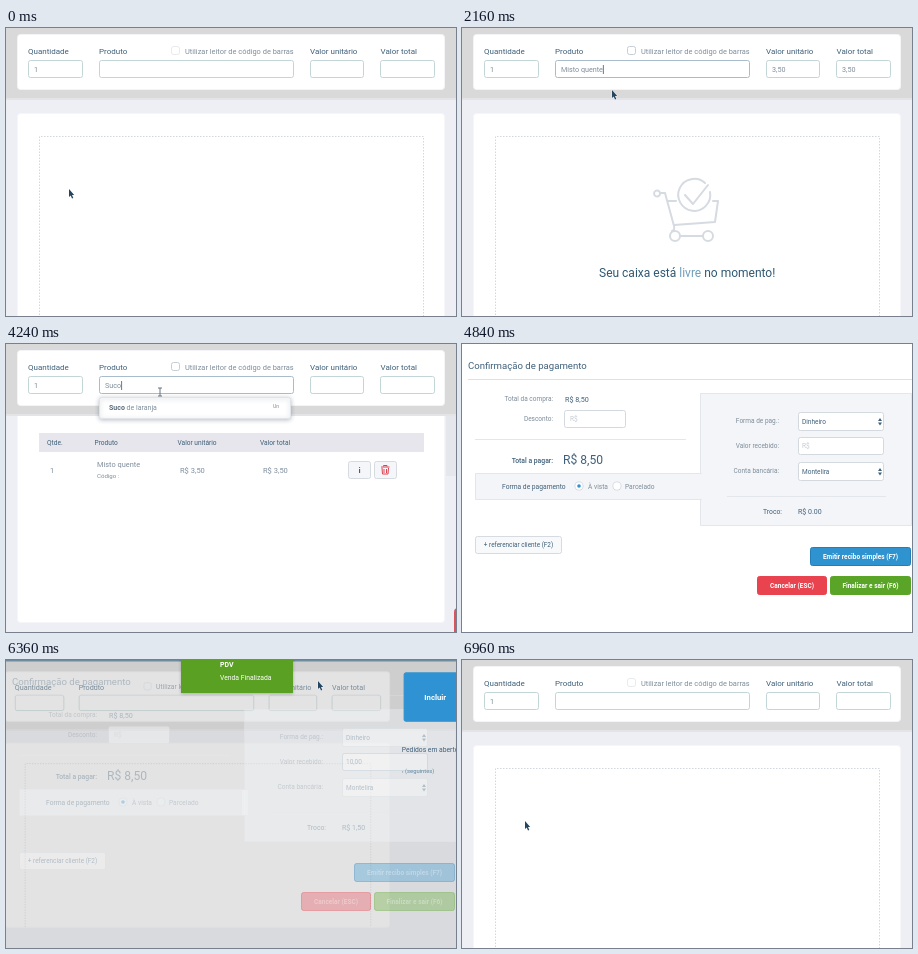
These frames come from a looping animation (450 px wide and 288 px high, 7 s). An HTML page with a canvas:

```html
<!DOCTYPE html>
<html lang="pt-BR">
<head>
<meta charset="utf-8">
<title>Frente de caixa</title>
<style>
html, body { margin: 0; width: 100%; height: 100%; overflow: hidden; background: #eeeff4; }
canvas { display: block; }
</style>
</head>
<body>
<canvas id="stage" width="450" height="288"></canvas>
<script>
const ctx = document.getElementById('stage').getContext('2d');
const LOOP = 7000, STEP = 40;
const SALE_END = 6100, REVEAL = 6280;
const INK = '#3f607a', SOFT = '#7e8d9b', PALE = '#c3cad2';

const ramp = (t, a, b) => Math.min(1, Math.max(0, (t - a) / (b - a)));
const ease = u => u * u * (3 - 2 * u);
const within = (t, a, b) => t >= a && t < b;
const typed = (s, t, start, gap) => t < start ? '' : s.slice(0, Math.floor((t - start) / gap) + 1);

// y is the visual middle of the line
function text(s, x, y, size, color = INK, weight = 400, align = 'left') {
  ctx.font = `${weight} ${size}px Roboto, sans-serif`;
  ctx.textAlign = align;
  ctx.fillStyle = color;
  ctx.fillText(s, x, y + size * .35);
  return ctx.measureText(s).width;
}

function box(x, y, w, h, fill, border, r = 2) {
  ctx.beginPath();
  ctx.roundRect(x + .5, y + .5, w - 1, h - 1, r);
  ctx.fillStyle = fill;
  ctx.fill();
  ctx.lineWidth = 1;
  ctx.strokeStyle = border || fill;
  ctx.stroke();
}

function path(d, color, width = 1) {
  ctx.strokeStyle = color;
  ctx.lineWidth = width;
  ctx.stroke(new Path2D(d));
}

function disc(x, y, r, fill) {
  ctx.beginPath();
  ctx.arc(x, y, r, 0, 7);
  ctx.fillStyle = fill;
  ctx.fill();
}

function fade(alpha, draw) {
  if (alpha <= 0) return;
  ctx.save();
  ctx.globalAlpha *= alpha;
  draw();
  ctx.restore();
}

function shadow(color, blur, dy, draw) {
  ctx.save();
  ctx.shadowColor = color;
  ctx.shadowBlur = blur;
  ctx.shadowOffsetY = dy;
  draw();
  ctx.restore();
}

// the register page is seen slightly smaller right after a sale
function camera(t, draw) {
  const zoom = t < REVEAL ? 1 : .9 + .1 * ease(ramp(t, 6440, 6880));
  const out = (1 - zoom) * 10;
  ctx.save();
  ctx.translate(-11 * out, 6 * out);
  ctx.scale(zoom, zoom);
  draw();
  ctx.restore();
}

function cart() {
  ctx.save();
  ctx.lineCap = ctx.lineJoin = 'round';
  path('M203 165H198a3 3 0 1 0 0 1M203 165L212 198Q213 202 210 203' +
    'M206 173H214M251 173H256L253 194L212 197' +
    'M218 208H241M218 208a5 5 0 1 0-10 0a5 5 0 1 0 10 0' +
    'M251 208a5 5 0 1 0-10 0a5 5 0 1 0 10 0' +
    'M243 155A16 16 0 1 0 248 164M223 167L231 176L246 157', '#d6dbe2', 2);
  ctx.restore();
}

function emptyState(t) {
  ctx.setLineDash([1.5, 1.5]);
  path('M33.5 290V108.5H417.5V290', '#d3d7dd');
  ctx.setLineDash([]);
  fade(t < SALE_END ? ramp(t, 40, 440) : 0, () => {
    cart();
    let x = 137;
    x += text('Seu caixa está ', x, 244.5, 12, '#2f5873');
    x += text('livre', x, 244.5, 12, '#6f9dba');
    text(' no momento!', x, 244.5, 12, '#2f5873');
  });
}

function row(y, name, price) {
  text('1', 44, y, 7.4, SOFT);
  text(name, 91, y - 6, 7.4, SOFT);
  text('Código :', 91, y + 6, 6.1, SOFT);
  text(price, 174, y, 7.5, SOFT);
  text(price, 257, y, 7.5, SOFT);
  box(342, y - 9, 23, 18, '#f5f6f9', '#d6dae1');
  box(368, y - 9, 23, 18, '#f5f6f9', '#d6dae1');
  text('i', 353.5, y, 8, INK, 700, 'center');
  path(`M375 ${y - 3}H383.500M377.500 ${y - 3.5}V${y - 4.5}H381V${y - 3.5}` +
    `M376 ${y - 2}L376.500 ${y + 4}H382L382.500 ${y - 2}M378 ${y - 1}V${y + 3}M380.500 ${y - 1}V${y + 3}`, '#dc4252', 1);
}

function table(t) {
  ctx.fillStyle = '#e6e6ec';
  ctx.fillRect(33, 108, 385, 19);
  [['Qtde.', 41], ['Produto', 88.5], ['Valor unitário', 171.5], ['Valor total', 254]]
    .forEach(([s, x]) => text(s, x, 117.5, 6.6));
  row(145, 'Misto quente', 'R$ 3,50');
  if (t >= 4440) row(182, 'Suco de laranja', 'R$ 5,00');
}

function input(x, w, value, focus) {
  box(x, 32, w, 18, '#fff', focus ? '#a9bccb' : '#c2d5d7');
  return x + 6 + text(value, x + 6, 41, 7.2, SOFT);
}

function suggestion(head, tail) {
  shadow('rgba(40,60,80,.3)', 4, 1, () => box(93, 53, 192, 22, '#fff', '#e0e4e9'));
  const w = text(head, 103, 64, 7, '#5d6d7c', 700);
  text(tail, 103 + w, 64, 7, SOFT);
  text('Un', 267, 62, 5.2, SOFT);
}

function header(t) {
  ctx.fillStyle = '#d9d9d9';
  ctx.fillRect(-20, -20, 560, 90);
  ctx.fillStyle = '#2f6385';
  ctx.fillRect(-20, -20, 560, 15);
  ctx.fillStyle = '#e4e4e7';
  ctx.fillRect(-20, 70, 560, 2);
  box(11, 6, 428, 56, '#fff', '#f4f4f6', 3);

  let product = '', price = '';
  if (t < 2000) product = typed('Misto', t, 900, 100);
  else if (t < 2360) [product, price] = ['Misto quente', '3,50'];
  else if (t < 4320) product = typed('Suco', t, 2800, 160);
  else if (t < 4440) [product, price] = ['Suco de laranja', '5,00'];
  const focus = within(t, 760, SALE_END);

  [['Quantidade', 22], ['Produto', 93], ['Valor unitário', 304], ['Valor total', 374.5]]
    .forEach(([s, x]) => text(s, x, 23.6, 8));
  text('Utilizar leitor de código de barras', 179, 23.3, 7.45, SOFT);
  fade(.4 + .6 * ramp(t, 40, 440) * (t < SALE_END), () => box(165, 18, 9, 9, '#fff', '#c5cdd5'));

  input(22, 55, within(t, SALE_END, 6440) ? '' : '1');
  const end = input(93, 195, product, focus);
  input(304, 54, price);
  input(374, 55, price);
  if (focus && (product || t % 800 < 400)) path(`M${end + .5} 37V46`, '#4a5a68', .8);

  if (within(t, 1440, 2000)) suggestion('Misto', ' quente');
  if (within(t, 3480, 4320)) suggestion('Suco', ' de laranja');
}

function register(t) {
  const filled = t < SALE_END ? ramp(t, 2360, 2560) : 0;
  ctx.save();
  ctx.translate(0, -19 * ease(filled));
  box(11, 85, 428, filled ? 213 : 206, '#fff', '#f6f6f9', 3);
  fade(1 - filled, () => emptyState(t));
  fade(filled, () => table(t));
  ctx.restore();
  fade(filled, () => {
    ctx.fillStyle = '#e6e7ec';
    ctx.fillRect(440, 70, 10, 62);
    box(448, 264, 40, 40, '#d9545c', '#d9545c', 3);
  });
  header(t);
}

function sidebar() {
  box(454, 7, 90, 55, '#2f93d3');
  text('Incluir', 477, 35, 8.6, '#fff', 700);
  text('Pedidos em aberto', 452, 93, 7.5);
  text('‹ (seguintes)', 452, 117, 6.5, '#5f87a3');
}

function select(y, value) {
  box(336, y, 86, 19, '#fff', '#d3d9df');
  text(value, 340, y + 9.5, 6.5, INK);
  ctx.fillStyle = INK;
  ctx.fill(new Path2D(`M416 ${y + 9}h4l-2-3zM416 ${y + 10.5}h4l-2 3z`));
}

function button(x, y, w, fill, border, label) {
  box(x, y, w, 19, fill, border);
  text(label, x + w / 2, y + 9.5, 6.5, '#fff', 700, 'center');
}

function payment(t) {
  const panel = '#f4f5f8', edge = '#e3e6eb';
  const received = typed('10,00', t, 5120, 80);
  ctx.fillStyle = '#fff';
  ctx.fillRect(0, 0, 450, 288);
  text('Confirmação de pagamento', 6, 22, 9.6);
  path('M6 35.5H450', '#dde1e6');

  text('Total da compra:', 91, 55, 6.5, SOFT, 400, 'right');
  text('R$ 8,50', 103, 55, 7.2);
  text('Desconto:', 91, 75, 6.5, SOFT, 400, 'right');
  box(102, 66, 62, 18, '#fff', '#d3d9df');
  text('R$', 108, 75, 6.5, PALE);
  path('M13 95.5H224', edge);
  text('Total a pagar:', 91, 117, 6.8, INK, 500, 'right');
  text('R$ 8,50', 101, 115.5, 12.1);

  box(238, 49, 212, 133, panel, edge, 0);
  box(13, 129, 227, 27, panel, edge, 0);
  ctx.fillStyle = panel;
  ctx.fillRect(236, 130, 6, 25);
  text('Forma de pagamento', 40, 142.5, 6.7);
  [117, 155].forEach(x => {
    disc(x, 142, 4.5, '#cfd6dd');
    disc(x, 142, 3.7, '#fff');
  });
  disc(117, 142, 1.8, '#2f93d3');
  text('À vista', 126, 142.5, 6.6, SOFT);
  text('Parcelado', 163, 142.5, 6.6, SOFT);

  text('Forma de pag.:', 317, 77, 6.5, SOFT, 400, 'right');
  text('Valor recebido:', 317, 102, 6.5, SOFT, 400, 'right');
  text('Conta bancária:', 317, 127, 6.5, SOFT, 400, 'right');
  select(68, 'Dinheiro');
  box(336, 93, 86, 18, '#fff', t >= 5040 ? '#a9bccb' : '#d3d9df');
  text(received || 'R$', 340, 102, 6.5, received ? INK : PALE);
  select(118, 'Montelira');
  path('M265 152.5H424', edge);
  text('Troco:', 320, 168, 6.8, INK, 400, 'right');
  text(t < 5520 ? 'R$ 0.00' : 'R$ 1,50', 336, 168, 7);

  box(13, 192, 87, 18, '#f8f9fb', '#d6dae1');
  text('+ referenciar cliente (F2)', 56.5, 201, 6.4, INK, 400, 'center');
  button(348, 203, 101, '#2f93d0', '#247fb8', 'Emitir recibo simples (F7)');
  button(295, 232, 70, '#e8434f', '#e8434f', 'Cancelar (ESC)');
  button(368, 232, 81, within(t, 5960, 6080) ? '#4a8d20' : '#5aa528', '#5aa528', 'Finalizar e sair (F6)');
}

function toast(t) {
  const y = -44 * (1 - ramp(t, 6240, 6400) + ramp(t, 6600, 6760));
  if (y <= -44) return;
  shadow('rgba(0,0,0,.25)', 3, 1, () => {
    ctx.fillStyle = '#5aa023';
    ctx.fillRect(175, y, 112, 44);
  });
  text('PDV', 214, y + 16, 7, '#fff', 700);
  text('Venda Finalizada', 214, y + 29, 6.8, '#fff');
}

// time, x, y
const track = [
  [0, 63, 161], [240, 63, 161], [720, 240, 41], [1040, 273, 41], [1120, 279, 41],
  [1240, 276, 41], [1480, 276, 41], [1760, 150, 62], [2160, 150, 62], [2600, 181, 38],
  [2760, 181, 38], [2840, 153, 38], [2920, 154, 48], [4400, 154, 48],
  [4880, 330, 180], [5080, 385, 102], [5560, 385, 102], [5920, 410, 241],
  [6120, 410, 241], [6320, 312, 21], [6440, 312, 21], [6840, 63, 161], [7000, 63, 161]
];

function pointerAt(t) {
  const i = track.findIndex(k => k[0] > t);
  const [a, b] = [track[i - 1], track[i]];
  const u = ramp(t, a[0], b[0]);
  return [a[1] + (b[1] - a[1]) * u, a[2] + (b[2] - a[2]) * u];
}

function pointer(t) {
  if (within(t, 4360, 4880)) return;
  const [x, y] = pointerAt(t);
  const beam = within(t, 680, 1520) || within(t, 2440, 4360) || within(t, 5040, 5600);
  if (!beam) {
    ctx.fillStyle = '#24455f';
    ctx.strokeStyle = '#fff';
    ctx.lineWidth = .6;
    const arrow = new Path2D(`M${x} ${y}v8l1.700-1.500l1.300 3l1.300-.6l-1.300-2.900h2.200z`);
    ctx.stroke(arrow);
    ctx.fill(arrow);
    return;
  }
  const [px, py] = pointerAt(t - 80);
  if (px === x && py === y) {
    path(`M${x - 2} ${y - 4}h4M${x} ${y - 4}v8M${x - 2} ${y + 4}h4`, '#5b6874', .9);
    return;
  }
  // a fast move leaves a striped trail
  for (const [gx, gy] of [[px, py], [x, y]])
    for (let d = -2; d <= 2; d += 2)
      path(`M${gx - 3} ${gy + d}h6`, '#7b8d9c', .8);
}

function draw(now) {
  const t = Math.floor(now % LOOP / STEP) * STEP;
  const paying = ramp(t, 4560, 4760) * (1 - ramp(t, 6160, 6460));
  ctx.fillStyle = '#eeeff4';
  ctx.fillRect(0, 0, 450, 288);
  camera(t, () => register(t));
  fade(paying * .5, () => {
    ctx.fillStyle = '#000';
    ctx.fillRect(0, 0, 450, 288);
  });
  fade(paying, () => payment(t));
  if (t >= REVEAL) camera(t, sidebar);
  toast(t);
  pointer(t);
}

const start = performance.now();
function loop() {
  draw(performance.now() - start);
  requestAnimationFrame(loop);
}
loop();
</script>
</body>
</html>
```
